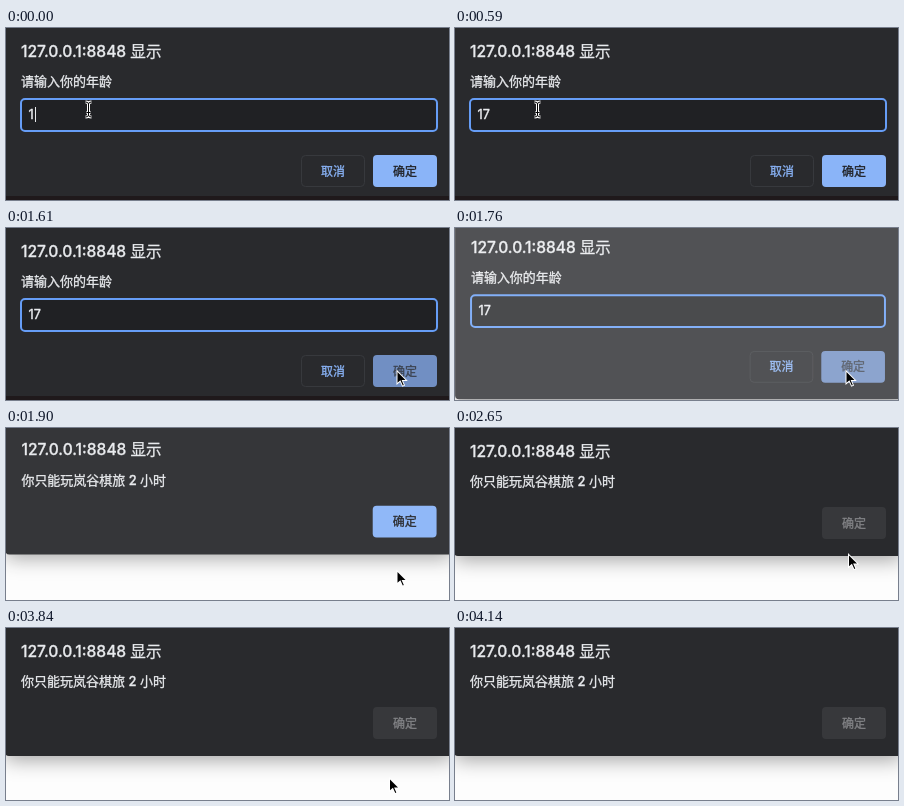
Recreate the animation shown at these times as an HTML page with a canvas. Size 443 by 172 pixels, loop 4730 ms.

```html
<!DOCTYPE html>
<html lang="zh">
<head>
<meta charset="utf-8">
<title>Prompt and alert</title>
<style>
  html, body { margin: 0; width: 100%; height: 100%; overflow: hidden; background: #fff; }
  canvas { display: block; width: 443px; height: 172px; }
</style>
</head>
<body>
<canvas id="stage"></canvas>
<script>
const W = 443, H = 172, LOOP = 4730;
const FONT = 'Inter, "Noto Sans CJK SC", "Noto Sans CJK", sans-serif';
const BLUE = '#8ab4f8', LIGHT = '#e8eaed', PANEL = '#292a2d', FIELD = '#202124';

const canvas = document.getElementById('stage');
const ctx = canvas.getContext('2d');
const ratio = window.devicePixelRatio || 1;
canvas.width = Math.round(W * ratio);
canvas.height = Math.round(H * ratio);

// Pointer steps: start time, shape, x, y
const pointer = [
  [0, 'beam', 82.5, 81.5],
  [730, 'beam', 147.5, 75.5],
  [870, 'arrow', 367, 167],
  [1020, 'arrow', 376, 160],
  [1170, 'arrow', 380, 149],
  [1310, 'arrow', 389, 143],
  [1460, 'arrow', 390.5, 141.5],
  [2650, 'arrow', 393, 125],
  [2800, 'arrow', 394, 113],
  [2950, 'arrow', 396, 106],
  [3100, 'arrow', 397, 101],
  [3390, 'none', 0, 0],
  [3840, 'arrow', 383, 149],
  [3990, 'arrow', 408, 162],
  [4140, 'none', 0, 0]
];

// A hairline stroke gives the text its medium weight
function text(str, x, y, size, color, align = 'left') {
  ctx.font = `500 ${size}px ${FONT}`;
  ctx.textAlign = align;
  ctx.textBaseline = 'alphabetic';
  ctx.fillStyle = ctx.strokeStyle = color;
  ctx.lineWidth = .3;
  ctx.lineJoin = 'round';
  ctx.fillText(str, x, y);
  ctx.strokeText(str, x, y);
}

function box(x, y, w, h, r, fill, stroke, line = 1) {
  ctx.beginPath();
  ctx.roundRect(x, y, w, h, r);
  if (fill) {
    ctx.fillStyle = fill;
    ctx.fill();
  }
  if (stroke) {
    ctx.strokeStyle = stroke;
    ctx.lineWidth = line;
    ctx.stroke();
  }
}

function poly(points, fill) {
  ctx.beginPath();
  points.forEach(([x, y]) => ctx.lineTo(x, y));
  ctx.closePath();
  ctx.fillStyle = fill;
  ctx.fill();
}

function button(label, x, y, fill, color, border) {
  if (border) box(x + .5, y + .5, 63, 31, 4, null, border);
  else box(x, y, 64, 32, 4, fill);
  text(label, x + 32, y + 20.5, 12, color, 'center');
}

function panel(bottom) {
  ctx.save();
  ctx.shadowColor = 'rgba(0,0,0,.36)';
  ctx.shadowBlur = 20 * ratio;
  ctx.shadowOffsetY = 4 * ratio;
  box(-1, -20, 448, bottom + 20, 4, PANEL);
  ctx.restore();
  text('127.0.0.1:8848 显示', 15, 28.5, 15.6, LIGHT);
}

function prompt(value, caretX, pressed) {
  panel(175.5);
  text('请输入你的年龄', 15, 58, 13, LIGHT);
  box(15, 71, 416, 32, 4, FIELD, '#669df6', 2);
  text(value, 22.5, 91, 12.5, LIGHT);
  if (caretX) {
    ctx.fillStyle = LIGHT;
    ctx.fillRect(caretX, 79, 1, 15);
  }
  button('取消', 295, 127, null, BLUE, '#37393d');
  if (pressed) button('确定', 367, 127, '#718fc3', '#3c4350');
  else button('确定', 367, 127, BLUE, FIELD);
}

function alertBox(enabled) {
  panel(128);
  text('你只能玩岚谷棋旅 2 小时', 15, 58, 13, LIGHT);
  if (enabled) button('确定', 367, 79, BLUE, FIELD);
  else button('确定', 367, 79, '#37383b', '#828386');
}

// Draws a dialog shrunk and raised, then veiled by the white page
function faded(draw, scale, dy, alpha) {
  ctx.save();
  ctx.translate(223.5 * (1 - scale), dy);
  ctx.scale(scale, scale);
  draw();
  ctx.restore();
  ctx.fillStyle = `rgba(255,255,255,${1 - alpha})`;
  ctx.fillRect(0, 0, W, H);
}

function arrow() {
  poly([[0, 0], [0, 15.6], [3.6, 12.4], [5.8, 17.2], [8.6, 16], [6.6, 11.5], [11.3, 11.5]], '#fff');
  poly([[1, 2.4], [1, 13.3], [3.9, 10.7], [6.3, 15.9], [7.3, 15.4], [5.1, 10.5], [9, 10.5]], '#000');
}

function beam() {
  const trace = (color, width) => {
    ctx.beginPath();
    ctx.moveTo(-3, -7.5);
    ctx.quadraticCurveTo(0, -7.5, 0, -5.5);
    ctx.quadraticCurveTo(0, -7.5, 3, -7.5);
    ctx.moveTo(0, -5.5);
    ctx.lineTo(0, 5.5);
    ctx.quadraticCurveTo(0, 7.5, -3, 7.5);
    ctx.moveTo(0, 5.5);
    ctx.quadraticCurveTo(0, 7.5, 3, 7.5);
    ctx.moveTo(-2, 3);
    ctx.lineTo(2, 3);
    ctx.strokeStyle = color;
    ctx.lineWidth = width;
    ctx.stroke();
  };
  trace('#fff', 3);
  trace('#000', 1);
}

function drawPointer(t) {
  const [, shape, x, y] = pointer.findLast(step => step[0] <= t);
  if (shape === 'none') return;
  ctx.save();
  ctx.translate(x, y);
  if (shape === 'beam') beam();
  else arrow();
  ctx.restore();
}

function draw(t) {
  ctx.setTransform(ratio, 0, 0, ratio, 0, 0);
  ctx.fillStyle = '#fdfdfd';
  ctx.fillRect(0, 0, W, H);

  if (t < 1760) {
    const caretOn = t < 590 || (t >= 1170 && t < 1610);
    const typed = t >= 140;
    prompt(typed ? '17' : '1', caretOn && (typed ? 36 : 29), t >= 1610);
    ctx.fillStyle = '#1f191b';
    ctx.fillRect(0, 168, W, 4);
  } else if (t < 1900) {
    faded(() => prompt('17', 0, true), .995, -3.4, .81);
  } else if (t < 2050) {
    faded(() => alertBox(true), .998, -1.2, .945);
  } else {
    alertBox(false);
  }
  drawPointer(t);
}

const start = performance.now();
function tick() {
  draw((performance.now() - start) % LOOP);
  requestAnimationFrame(tick);
}
tick();
</script>
</body>
</html>
```
